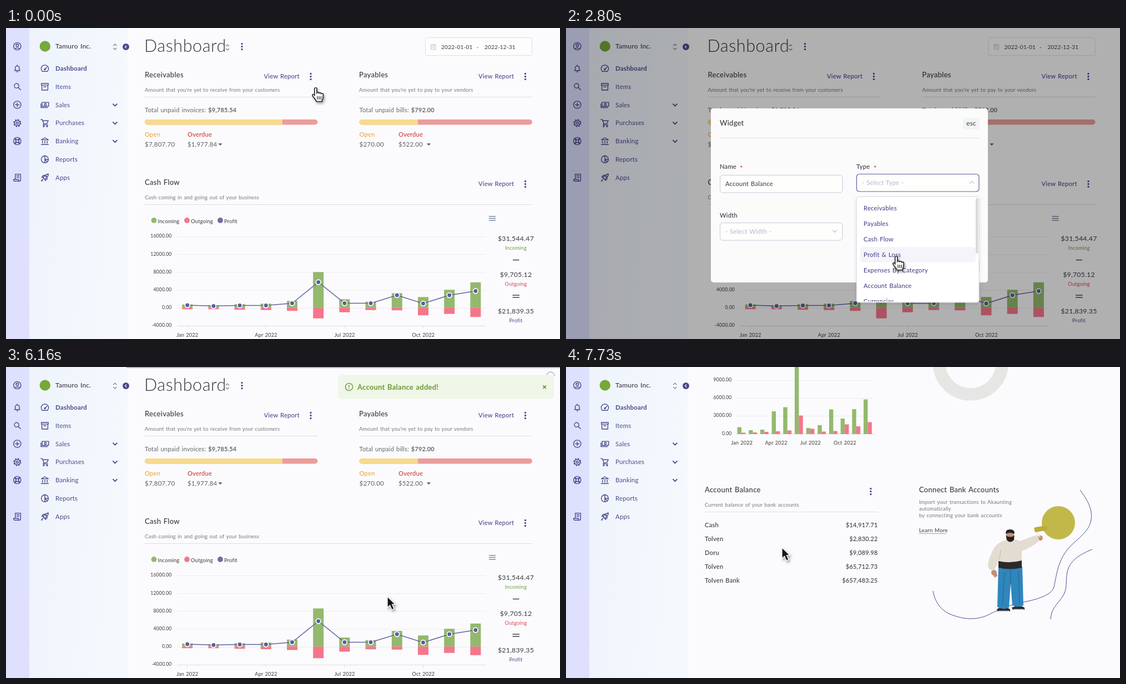
An HTML page that plays this animation: 998 by 561 pixels, repeating every 8000 ms.

```html
<!DOCTYPE html>
<html lang="en">
<head>
<meta charset="utf-8">
<title>Dashboard</title>
<style>
html, body { margin: 0; width: 100%; height: 100%; overflow: hidden; background: #fbfbfd; }
svg { display: block; width: 998px; height: 561px; }
text { font-family: Lato, sans-serif; letter-spacing: .018em; word-spacing: .08em; white-space: pre; }
.ico { fill: none; stroke: #4c4a8f; stroke-width: 1.4; stroke-linecap: round; stroke-linejoin: round; }
#cursor { filter: drop-shadow(2px 3px 2px rgba(0,0,0,.38)); }
#drop1, #drop2 { filter: drop-shadow(0 2px 3px rgba(0,0,0,.12)); }
</style>
</head>
<body>
<svg id="stage" viewBox="0 0 998 561" xmlns="http://www.w3.org/2000/svg"></svg>
<script>
const LOOP = 8000, OPEN = 440, RELOAD = 5730;
const INK = '#3b3b40', PURPLE = '#4c4a8f', GREEN = '#93b96d', RED = '#f4768a', SOFT = '#77777e';

// drawing helpers
const text = (x, y, s, size = 11.2, fill = INK, weight = 400, anchor = 'start') =>
  `<text x="${x}" y="${y}" font-size="${size}" fill="${fill}" font-weight="${weight}" text-anchor="${anchor}">${s}</text>`;
const rect = (x, y, w, h, fill, r = 0, more = '') =>
  `<rect x="${x}" y="${y}" width="${w}" height="${h}" rx="${r}" fill="${fill}" ${more}/>`;
const disc = (x, y, r, fill, more = '') => `<circle cx="${x}" cy="${y}" r="${r}" fill="${fill}" ${more}/>`;
const path = (d, stroke = PURPLE, w = 1, fill = 'none', more = '') =>
  `<path d="${d}" fill="${fill}" stroke="${stroke}" stroke-width="${w}" ${more}/>`;
const shape = (d, fill) => `<path d="${d}" fill="${fill}"/>`;
const hline = (x1, x2, y, stroke = '#dcdce6', w = 1) => path(`M${x1},${y}H${x2}`, stroke, w);
const dots = (x, y) => [-5, 0, 5].map(d => disc(x, y + d, 1.65, PURPLE)).join('');
const burger = (x, y) => [-3.6, 0, 3.6].map(d => hline(x - 6, x + 6, y + d, '#6a7a90', 1.3)).join('');
const icon = (x, y, s) => `<g class="ico" transform="translate(${x},${y})">${s}</g>`;
const ring = (x, y, r, more = '') => `<circle cx="${x}" cy="${y}" r="${r}" ${more}/>`;
const line = d => `<path d="${d}"/>`;
const updown = (x, y) => path(`M${x - 3},${y - 2}l3,-3l3,3M${x - 3},${y + 2}l3,3l3,-3`, '#77777f', 1.1);

function head(x, y, title, sub, x2, report = true) {
  return text(x, y, title, 13.1, INK, 500) + text(x, y + 26, sub, 9.5, SOFT) + hline(x, x2, y + 35.5) +
    (report ? text(x2 - 97, y + 2, 'View Report', 11.2, PURPLE, 500) : '') + dots(x2 - 12.5, y - 1.5);
}

function unpaid(x, label, total, split, open, overdue, x2, caret) {
  return text(x, 152, `${label} <tspan font-weight="700" font-size="10.9">${total}</tspan>`, 11.1, '#66666c') +
    rect(x, 165, 311.5, 9.5, '#ea9d9b', 4.7) +
    shape(`M${split},165H${x + 4.7}a4.7,4.75 0 0 0 0,9.5H${split}Z`, '#f7da8e') +
    text(x, 195.5, 'Open', 11.2, '#eca02f') + text(x2, 195.5, 'Overdue', 11.2, '#cc2d2d') +
    text(x, 213.5, open, 11.6, '#606067') + text(x2, 213.5, overdue, 11.4, '#606067') +
    shape(`M${caret - 3.5},208.3h7l-3.5,3.8Z`, '#55555c');
}

function axis(labels, y0, x1, x2) {
  return labels.map((s, i) => {
    const y = y0 + i * 32.2, last = i === labels.length - 1;
    return text(298.5, y + 1.8, s + '.00', 8.6, INK, 400, 'end') + hline(x1, x2, y, last ? '#dedee2' : '#ececf0');
  }).join('');
}
const months = (x, step, y) => ['Jan', 'Apr', 'Jul', 'Oct'].map((m, i) =>
  text(x + i * step, y, m + ' 2022', 9.2, INK, 400, 'middle')).join('');

// chart data in pixels
const cashIn = [5.5, 4, 6, 7, 12, 64, 15, 10.5, 26, 19, 32, 45.5];
const cashOut = [3, 3, 4, 4.5, 6, 19.5, 8.5, 4.5, 5, 14, 11.5, 17];
const profit = [4, 2.5, 3.5, 3.5, 7.5, 45.5, 7.5, 7.5, 22, 7, 22, 29.5];
const earned = [12.5, 7, 8, 41, 48.5, 137, 11, 16, 44.5, 28, 45, 62.5];
const spent = [2.5, 3, 4, 5, 6.5, 33.5, 9.5, 4.5, 5.5, 17.5, 14, 21.5];
const cashX = i => 326.7 + i * 47.2;

function overview() {
  return text(249, 43.1, 'Dashboard', 30.6, '#36363b', 300) + updown(399, 35) + dots(425, 33.5) +
    rect(755.5, 17.5, 192, 32, '#fdfdfe', 2, 'stroke="#e0e0e6"') +
    path('M765.5,30h8.5v8.5h-8.5ZM765.5,32.8h8.5M767.7,28.6v2M772,28.6v2M767.5,35.6h4.5', '#bdbdc6', .9) +
    text(784, 37.5, '2022-01-01', 10.2) + text(847.5, 37.5, '-', 10.2) + text(862, 37.5, '2022-12-31', 10) +
    head(250, 89, 'Receivables', "Amount that you're yet to receive from your customers", 561.5) +
    head(636, 89, 'Payables', "Amount that you're yet to pay to your vendors", 948) +
    unpaid(250, 'Total unpaid invoices:', '$9,785.54', 498, '$7,807.70', '$1,977.84', 327, 386) +
    unpaid(636.5, 'Total unpaid bills:', '$792.00', 742, '$270.00', '$522.00', 707, 761.5) +
    head(250, 283, 'Cash Flow', 'Cash coming in and going out of your business', 948) +
    disc(266.5, 347, 4.9, GREEN) + text(273.5, 351.5, 'Incoming', 9.4) +
    disc(326, 347, 4.9, RED) + text(333, 351.5, 'Outgoing', 9.4) +
    disc(386, 347, 4.9, '#6c6da6') + text(393, 351.5, 'Profit', 9.4) + burger(876, 343.5) +
    axis(['16000', '12000', '8000', '4000', '0', '-4000'], 376.5, 309, 864) +
    path([0, 3, 6, 9].map(i => `M${cashX(i)},537v5`).join(''), '#dedee2') + months(cashX(0), 141.7, 557) +
    `<path id="bars1" fill="${GREEN}"/><path id="bars2" fill="${RED}"/>
     <path id="trend" fill="none" stroke="#6264a0" stroke-width="1.6"/><g id="marks">` +
    profit.map((p, i) => disc(cashX(i), 0, 4.3, '#5c5d9e', 'stroke="#fff" stroke-width="1.7"')).join('') + '</g>' +
    [['$31,544.47', 384, 'Incoming', '#6da036'], ['$9,705.12', 449.3, 'Outgoing', '#e3405a'], ['$21,839.35', 515, 'Profit', PURPLE]]
      .map(([v, y, s, c]) => text(918.5, y, v, 12.3, INK, 400, 'middle') + text(918.5, y + 16, s, 9.4, c, 400, 'middle')).join('') +
    hline(913, 924.5, 418.5, INK, 1.4) + hline(912.5, 925, 482, INK, 1.4) + hline(912.5, 925, 486, INK, 1.4);
}

function reports() {
  const bars = (data, dx) => data.map((h, i) => `M${308.6 + dx + i * 20.68},439h7.4v${-h}h-7.4Z`).join('');
  const legend = [['$9,705.12 - Other', '#e6e6e4'], ['$0.00 - Costavelm', '#82bf63'], ['$0.00 - Withdrawal', '#2b5a1b']];
  return head(250, 184, 'Profit &amp; Loss', 'Income and expenses including unpaid invoices and bills', 561.5) +
    head(636, 184, 'Expenses By Category', 'Top expenses across various categories', 948) +
    disc(266.5, 248, 4.9, GREEN) + text(273.5, 252.5, 'Income', 9.4) +
    disc(318, 248, 4.9, RED) + text(325, 252.5, 'Expense', 9.4) + burger(548.5, 244.5) + burger(934.5, 244.5) +
    axis(['15000', '12000', '9000', '6000', '3000', '0'], 277.8, 306, 555) + months(316.7, 61.9, 458.3) +
    shape(bars(earned, 0), GREEN) + shape(bars(spent, 7.4), RED) +
    `<circle cx="729" cy="310.5" r="56.8" fill="none" stroke="#e6e6e4" stroke-width="22.6"/>` +
    path('M729,240V268', '#fbfbfd', 2) +
    legend.map(([s, c], i) => disc(836, 264 + i * 18.6, 4.8, c) + text(843, 268.3 + i * 18.6, s, 9.5)).join('');
}

function painter() {
  const skin = '#c58f74', wool = '#e3dcd0', shoe = '#2d2a2c';
  return shape('M776,437q12,-8 24,0v4h-22ZM803,434q14,-6 23,0v4h-21Z', shoe) + hline(779, 799, 440.5, '#d8d5d0', 1.6) + hline(806, 825, 437.5, '#d8d5d0', 1.6) +
    shape('M779,360H822L824,430Q814,435 804,430L801,390L798,434Q788,439 777,433Z', '#2f86bd') +
    path('M801,366V392M790,370L786,430M815,368L817,426', '#2571a3', 1.5) +
    disc(771, 371, 5, skin) + shape('M766,369l9,0l2,8l-5,3Z', skin) + disc(854, 308.5, 4.8, skin) +
    shape('M790,313Q774,317 767,335Q758,353 761,362Q767,371 773,364L780,347V354H821V332Q840,325 853,313L849,303Q832,308 819,314Q804,308 790,313Z', wool) +
    path('M780,347Q783,338 783,330', '#c6beb1', 1.2) +
    shape('M779,350Q800,355 821,349V362Q800,367 779,362Z', '#2b292b') +
    `<ellipse cx="800" cy="304" rx="7.3" ry="9.5" fill="${skin}"/>` +
    shape('M792.5,301Q791,293 800,293Q809,293 807.6,301Q800,297 792.5,301ZM792.5,304Q800,309 807.7,304L807,312Q800,319 794,312Z', '#262224') +
    path('M854,307L849,300Q843,296 846,293', '#e8e8e8', 2) +
    `<rect x="843.5" y="287.5" width="23" height="9" rx="3" fill="#b9ad3b" transform="rotate(-9 855 292)"/>`;
}

function accounts() {
  const rows = [['Cash', '$14,917.71'], ['Tolven', '$2,830.22'], ['Doru', '$9,089.98'], ['Tolven', '$65,712.73'], ['Tolven Bank', '$657,483.25']];
  return head(250, 226, 'Account Balance', 'Current balance of your bank accounts', 561.5, false) +
    rows.map(([a, b], i) => text(250, 289.3 + i * 24.9, a, 11.2, INK, 500) + text(561.5, 289.3 + i * 24.9, b, 10.9, INK, 500, 'end')).join('') +
    text(636, 226, 'Connect Bank Accounts', 13.1, INK, 500) +
    text(636, 246.7, 'Import your transactions to Akaunting', 9.5, SOFT) + text(636, 259, 'automatically', 9.5, SOFT) +
    text(636, 271.3, 'by connecting your bank accounts', 9.5, SOFT) +
    text(636, 297.5, 'Learn More', 9.8) + hline(636, 685, 300.5, '#88888e', .8) +
    path('M926,222C938,238 949,255 946,275C943,297 922,309 907,325C886,348 884,374 879,397C874,412 850,419 820,425C800,429 780,437 765,445C745,456 720,458 690,445C672,436 664,420 661,404') +
    path('M948,329C925,338 907,350 903,370C900,385 903,395 898,408C890,425 874,432 873,455') +
    disc(887, 281, 30, '#c2b84a') + painter();
}

function sidebar() {
  const menu = ['Dashboard', 'Items', 'Sales', 'Purchases', 'Banking', 'Reports', 'Apps'];
  const art = [
    line('M-4.6,5A6.6,6.6 0 1 1 4.6,5ZM0,1.5L3.4,-2.4') + ring(0, 1.3, 1),
    line('M-6.2,-6H6.2V-2.8H-6.2ZM-5.4,-2.8V6H5.4V-2.8M-2,0H2'),
    line('M-5,-4.6H6.8V2.6H-5ZM-7,-2V4.8H4.8') + ring(.9, -1, 1.7),
    line('M-7,-6.2H-4.6L-1.8,1.2H3.6L6.2,-4.2H-3.6M-1.8,1.2L-3,3.2H5') + ring(-2, 5.8, 1) + ring(4, 5.8, 1),
    line('M-6.4,-2.6L0,-6.2L6.4,-2.6ZM-4.2,-.2V3.6M0,-.2V3.6M4.2,-.2V3.6M-6.4,6H6.4'),
    ring(0, 0, 6.4) + line('M0,-6.4V0H6.4M0,0L4.4,4.6M0,-6.4V6.4'),
    line('M-3,1C-1,-4 2,-6 6.4,-6.4C6,-2 4,1 -1,3ZM-2,-1.2L-5.6,-.4L-3,-4L.2,-4M1.2,2L.4,5.6L4,3L4,-.2M-3.6,3L-6.4,6.4L-4.6,6') + ring(2.2, -2.2, .9)
  ];
  const strip = [
    [33, ring(0, 0, 6.6) + ring(0, -1.8, 2.2) + line('M-4.3,4.6C-2.4,2.4 2.4,2.4 4.3,4.6')],
    [73, line('M-5,3.8H5M-3.7,3.8V-.8C-3.7,-5.6 3.7,-5.6 3.7,-.8V3.8M0,-6.2V-4.8M-1,6H1')],
    [105.5, ring(-1.2, -1.2, 4.1) + line('M2,2L6,6')],
    [138.5, ring(0, 0, 6.6) + line('M-3.3,0H3.3M0,-3.3V3.3')],
    [171.5, ring(0, 0, 5) + ring(0, 0, 2) + ring(0, 0, 6.2, 'stroke-width="1.8" stroke-dasharray="2.435" style="stroke-linecap:butt"')],
    [204, ring(0, 0, 6.6) + ring(0, 0, 2.8) + [45, 135, 225, 315].map(a => `<path d="M3,0H6.2" stroke-width="2.4" transform="rotate(${a})"/>`).join('')],
    [270, line('M-3.6,3V-6.4H6V4.2Q6,6.3 4,6.3H-4.8Q-6.6,6.3 -6.6,3H2.2V4.4Q2.2,6.3 4,6.3M-.8,-3.5H3.2M-.8,-.6H3.2')]
  ];
  return rect(0, 0, 42, 561, '#dee0fe') + rect(42, 0, 177, 561, 'url(#side)') +
    strip.map(([y, s]) => icon(20.3, y, s)).join('') +
    disc(70.3, 33, 9.7, '#76a83a') + text(89, 37.3, 'Tamuro Inc.', 12, INK, 500) + updown(196.3, 34) +
    disc(216, 34, 6, PURPLE) + path('M217,31.6l-2.4,2.4l2.4,2.4', '#fff', 1.3) +
    menu.map((s, i) => {
      const y = 73.2 + i * 32.75;
      return icon(70, y, art[i]) + text(89, y + 4, s, 11.4, PURPLE, i ? 400 : 700) +
        (i > 1 && i < 5 ? path(`M192.4,${y - 2}l4,4l4,-4`, PURPLE, 1.8) : '');
    }).join('');
}

const field = (id, x, y) => rect(x + .5, y + .5, 220.5, 31.5, '#fefefd', 5, `id="${id}"`);
const label = (x, y, s, star) => text(x, y, s, 11.2, INK, 500) + (star ? text(star, y + 2.5, '*', 11.2, '#d33', 700) : '');
const slot = (id, x, y) => `<text id="${id}" x="${x}" y="${y}" font-size="11.2"/>`;
const caret = id => `<path id="${id}" fill="none" stroke="#c0c0d0" stroke-width="1.1"/>`;

function list(id, x, y, h, items) {
  return `<g id="${id}">` + rect(x + .5, y + .5, 220.5, h, '#fff', 4, 'stroke="#dfdfe8"') +
    rect(x + 7, 0, 208, 27.5, '#f4f4fa', 5, `id="${id}hover"`) + `<g clip-path="url(#clip)">` +
    items.map((s, i) => text(x + 13, y + 25 + i * 28, s, 11.3, '#3f3c86')).join('') + '</g>' +
    (items.length > 4 ? rect(738, 307, 4.5, 100, '#dadade', 2) : '') + '</g>';
}

function modal() {
  return rect(261, 145, 499, 314, '#fbfbfc', 5) + text(277, 176.2, 'Widget', 13, INK, 500) +
    rect(715, 162, 30, 21, '#f1f4f5', 5) + text(730, 176.2, 'esc', 11.8, INK, 400, 'middle') + hline(277, 744, 198.5, '#e2e2e6') +
    label(277, 254.3, 'Name', 313.5) + label(523, 254.3, 'Type', 554.5) + label(277, 342.3, 'Width') + label(523, 342.3, 'Sort') +
    field('name', 277, 265) + field('type', 523, 263) + field('width', 277, 351) + field('sort', 523, 353) +
    slot('nameText', 287, 285.3) + slot('typeText', 533, 283.3) + slot('widthText', 287, 371.3) + text(533, 373.5, '0', 11.4) +
    caret('typeArrow') + caret('widthArrow') +
    text(615, 434, 'Cancel', 13.1) + rect(679, 415.5, 65.5, 28, '#75a338', 5) + text(711.7, 434, 'Save', 13, '#fff', 500, 'middle') +
    list('drop1', 523, 304, 190.5, ['Receivables', 'Payables', 'Cash Flow', 'Profit &amp; Loss', 'Expenses By Category', 'Account Balance', 'Currencies']) +
    list('drop2', 277, 392, 125.5, ['25%', '33%', '50%', '100%']);
}

const toast = rect(598, 14.5, 389, 43, '#f0f6e8', 5) +
  path('M618,32.4v4.4M618,38.6v1.4', '#6a9c36', 1.5) + `<circle cx="618" cy="36" r="6.6" fill="none" stroke="#6a9c36" stroke-width="1.4"/>` +
  text(633, 40.7, 'Account Balance added!', 13, '#699a35', 700) + path('M967.4,33.4l5.6,5.6m0,-5.6l-5.6,5.6', '#5f8f30', 1.6);

const hand = path('M-2.2,1.6C-2.2,-.9 2,-.9 2,1.6V9C3,7.6 5.5,7.8 5.8,9.5C7,8.3 9.4,8.7 9.6,10.5C11,9.5 13.5,10 13.5,12.2L13,18C12.7,21 11,22 11,24.5H1C1,22 -2.5,19 -5,15.5C-7.3,12.4 -5,10.4 -3.2,12.2L-2.2,13.4Z', '#2b2b2e', 1.7, '#fff') +
  path('M3,15v6M6.2,15v6M9.4,15v6', '#2b2b2e', 1.3);
const arrow = path('M0,0V20L4.6,15.8L8,23.8L12,22L8.6,14.2H14.4Z', '#fff', 1.3, '#151517');

const $ = id => document.getElementById(id);
$('stage').innerHTML = `<defs>
  <linearGradient id="side" x2="1" y2=".25"><stop stop-color="#eef3fc"/><stop offset="1" stop-color="#f5f9fd"/></linearGradient>
  <clipPath id="clip"><path d="M261,300H760V493.5H499V520H261Z"/></clipPath></defs>` +
  rect(0, 0, 998, 561, '#fbfbfd') +
  `<g id="page">${overview()}<g transform="translate(0,460)">${reports()}</g><g transform="translate(0,778)">${accounts()}</g></g>` +
  sidebar() +
  `<g id="dim">${rect(0, 0, 998, 561, '#000', 0, 'opacity=".3"')}${modal()}</g>
  <g id="load">${rect(0, 0, 1, 2, '#6f67ab', 0, 'id="bar"')}
  <path id="spin" d="M974,16a7,7 0 1 1 14,0" fill="none" stroke="#6f67ab" stroke-width="1.6"/></g>
  <g id="toast">${toast}</g>
  <g id="cursor"><g id="hand">${hand}</g><g id="arrow">${arrow}</g></g>`;

// timing
const clamp = u => Math.max(0, Math.min(1, u));
const smooth = u => { u = clamp(u); return u * u * (3 - 2 * u); };
const back = u => { const v = clamp(u) - 1; return 1 + 2.70158 * v ** 3 + 1.70158 * v * v; };
const within = (t, a, b) => t >= a && t < b;
const step = t => Math.floor((t + 10) / 30) * 30;

// cursor moves: start, end, x, y
const moves = [
  [0, 0, 558, 108], [0, 250, 424, 36], [300, 420, 445, 67], [730, 960, 366, 256],
  [2160, 2390, 736, 280], [2500, 2800, 595, 412], [2800, 2960, 577, 470],
  [3030, 3290, 470, 367], [3360, 3570, 285, 467], [3610, 3800, 491, 392],
  [3830, 4000, 640, 372], [4260, 4440, 687, 414], [7130, 7360, 389, 325.5]
];
function pointer(t) {
  let [, , x, y] = moves[0];
  for (const [a, b, nx, ny] of moves) {
    if (t < a || b === a) continue;
    const k = smooth((t - a) / (b - a));
    x += (nx - x) * k;
    y += (ny - y) * k;
  }
  return [x, y];
}

const show = (id, on) => $(id).setAttribute('display', on ? 'inline' : 'none');
const set = (id, k, v) => $(id).setAttribute(k, v);
function fill(id, value, hint) {
  $(id).textContent = value || hint;
  set(id, 'fill', value ? INK : '#b7b5cd');
}
function focus(id, on) {
  set(id, 'stroke', on ? '#605ea0' : '#c6c6da');
  set(id, 'stroke-width', on ? 1.2 : 1);
}
function chevron(id, x, y, open) {
  const d = open ? -2 : 2;
  set(id, 'd', `M${x - 4},${y - d}l4,${2 * d}l4,${-2 * d}`);
}
function hover(id, top, count, y) {
  const i = Math.floor((y - top) / 28);
  show(id + 'hover', i >= 0 && i < count);
  set(id + 'hover', 'y', top + i * 28);
}

function drawChart(t) {
  const grow = i => t < RELOAD ? 1 : back((t - 5732) / 400 - .07 * i);
  const rise = t < RELOAD ? 1 : smooth((t - 5732) / 400);
  const bars = (data, sign) => data.map((h, i) => `M${cashX(i) - 9.5},504.3h19v${sign * h * grow(i)}h-19Z`).join('');
  const ys = profit.map(p => 504 - p * rise);
  set('bars1', 'd', bars(cashIn, -1));
  set('bars2', 'd', bars(cashOut, 1));
  set('trend', 'd', 'M' + ys.map((y, i) => cashX(i) + ',' + y).join('L'));
  [...$('marks').children].forEach((c, i) => c.setAttribute('cy', ys[i]));
}

function draw(t) {
  const open = within(t, OPEN, RELOAD);
  const [x, y] = pointer(t);
  const scroll = Math.round(778 * smooth((step(t) - 6404) / 456));
  set('page', 'transform', `translate(${open ? 5.5 : 0},${-scroll})`);
  drawChart(t);

  show('dim', open);
  set('dim', 'opacity', clamp((t - OPEN) / 110));
  const typed = t < 1150 ? 0 : Math.min(15, 1 + Math.floor((t - 1150) / 57.8));
  fill('nameText', 'Account Balance'.slice(0, typed), 'Enter Name');
  fill('typeText', t >= 3010 && 'Account Balance', '- Select Type -');
  fill('widthText', t >= 3600 && '50%', '- Select Width -');
  focus('name', within(t, 930, 2420));
  focus('type', within(t, 2420, 3320));
  focus('width', within(t, 3320, 3860));
  focus('sort', within(t, 3980, 4460));
  const d1 = within(t, 2420, 3010), d2 = within(t, 3320, 3600);
  show('drop1', d1);
  show('drop2', d2);
  chevron('typeArrow', 731, 278.5, d1);
  chevron('widthArrow', 484, 366.5, d2);
  hover('drop1', 311, 7, y);
  hover('drop2', 399, 4, y);

  show('load', within(t, 4470, 6230));
  set('load', 'opacity', clamp((6230 - t) / 140));
  const done = t >= RELOAD, left = done ? 217 : 0;
  set('bar', 'x', left);
  set('bar', 'width', done ? 781 : 998 * (.08 + .9 * (1 - (1 - clamp((t - 4470) / 760)) ** 2)));
  set('spin', 'transform', `rotate(${done ? (t - 6160) * .9 : clamp((t - 4470) / 760) * 700} 981 16)`);
  show('toast', within(t, 5850, 7730));

  const isHand = t < 470 || within(t, 2300, 3010) || within(t, 3230, 3640) || within(t, 4380, RELOAD);
  show('cursor', !within(t, 1130, 2160));
  show('hand', isHand);
  show('arrow', !isHand);
  set('cursor', 'transform', `translate(${x},${y})`);
}

const start = performance.now();
function tick(now) {
  draw(Math.max(0, now - start) % LOOP);
  requestAnimationFrame(tick);
}
draw(0);
requestAnimationFrame(tick);
</script>
</body>
</html>
```
